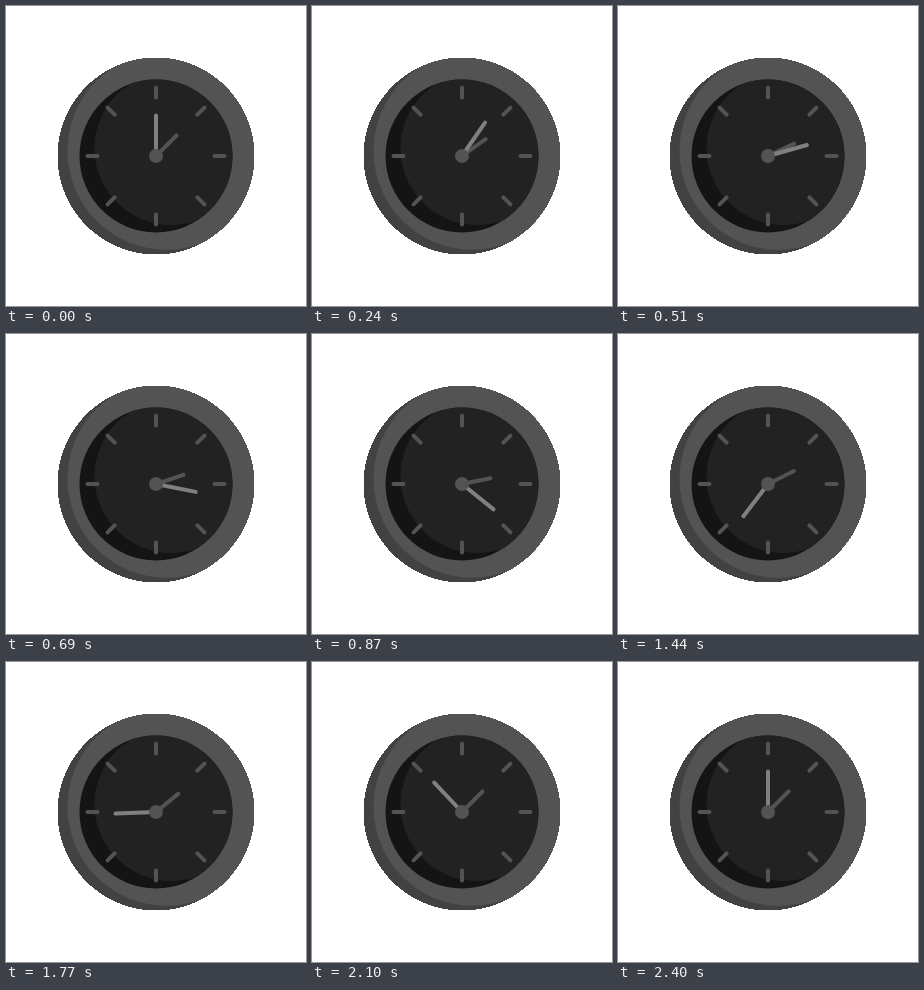
Write an HTML page with a canvas that moves like this. It is 300 px wide and 300 px high and loops after 2.49 s.

```html
<!DOCTYPE html>
<html lang="en">
<head>
<meta charset="utf-8">
<title>Clock</title>
<style>
  html, body { margin: 0; width: 100%; height: 100%; overflow: hidden; background: #fff; }
  canvas { display: block; width: 300px; height: 300px; }
</style>
</head>
<body>
<canvas id="stage" width="300" height="300"></canvas>
<script>
const ctx = document.getElementById("stage").getContext("2d");
const LOOP = 2490, STEP = 30, TURN = 2400;
const HOUR_PEAK = 960, HOUR_START = 45, HOUR_SWING = 37;
const CENTER = 150, RIM = 98.5, FACE = 76.5;
const DEG = Math.PI / 180;

function disc(x, y, r, color) {
  ctx.fillStyle = color;
  ctx.beginPath();
  ctx.arc(x, y, r, 0, 2 * Math.PI);
  ctx.fill();
}

// A disc in shade, lit by the same disc shifted up and to the right.
function shadedDisc(r, shift, shade, light) {
  disc(CENTER, CENTER, r, shade);
  ctx.save();
  ctx.beginPath();
  ctx.arc(CENTER, CENTER, r, 0, 2 * Math.PI);
  ctx.clip();
  disc(CENTER + shift, CENTER - shift / 2, r, light);
  ctx.restore();
}

// A rounded line along a clock angle, between two distances from the centre.
function spoke(angle, from, to, color) {
  const dx = Math.sin(angle * DEG), dy = -Math.cos(angle * DEG);
  ctx.strokeStyle = color;
  ctx.lineWidth = 4;
  ctx.lineCap = "round";
  ctx.beginPath();
  ctx.moveTo(CENTER + from * dx, CENTER + from * dy);
  ctx.lineTo(CENTER + to * dx, CENTER + to * dy);
  ctx.stroke();
}

// Crisp, unsmoothed outer edge.
function trimRim() {
  ctx.fillStyle = "#fff";
  for (let y = 0; y < 300; y++) {
    const dy = y + 0.5 - CENTER;
    const half = Math.round(Math.sqrt(Math.max(0, RIM * RIM - dy * dy)));
    ctx.fillRect(0, y, CENTER - half, 1);
    ctx.fillRect(CENTER + half, y, CENTER - half, 1);
  }
}

function draw(time) {
  const t = Math.min(Math.floor((time % LOOP) / STEP) * STEP, TURN);
  const turn = t / TURN;
  const minute = 360 * turn - 2.3 * Math.sin(2 * Math.PI * turn);
  const swing = Math.max(0, 1 - Math.abs(t - HOUR_PEAK) / HOUR_PEAK);

  ctx.fillStyle = "#fff";
  ctx.fillRect(0, 0, 300, 300);
  shadedDisc(RIM + 0.5, 10.5, "#424242", "#535353");
  trimRim();
  shadedDisc(FACE, 15, "#141414", "#222222");
  for (let a = 0; a < 360; a += 45) spoke(a, 58.5, 68.5, "#535353");
  spoke(HOUR_START + HOUR_SWING * swing, 0, 29, "#535353");
  spoke(minute, 0, 40.5, "#808080");
  disc(CENTER, CENTER, 7, "#535353");
}

function tick(now) {
  draw(now);
  requestAnimationFrame(tick);
}
draw(0);
requestAnimationFrame(tick);
</script>
</body>
</html>
```
